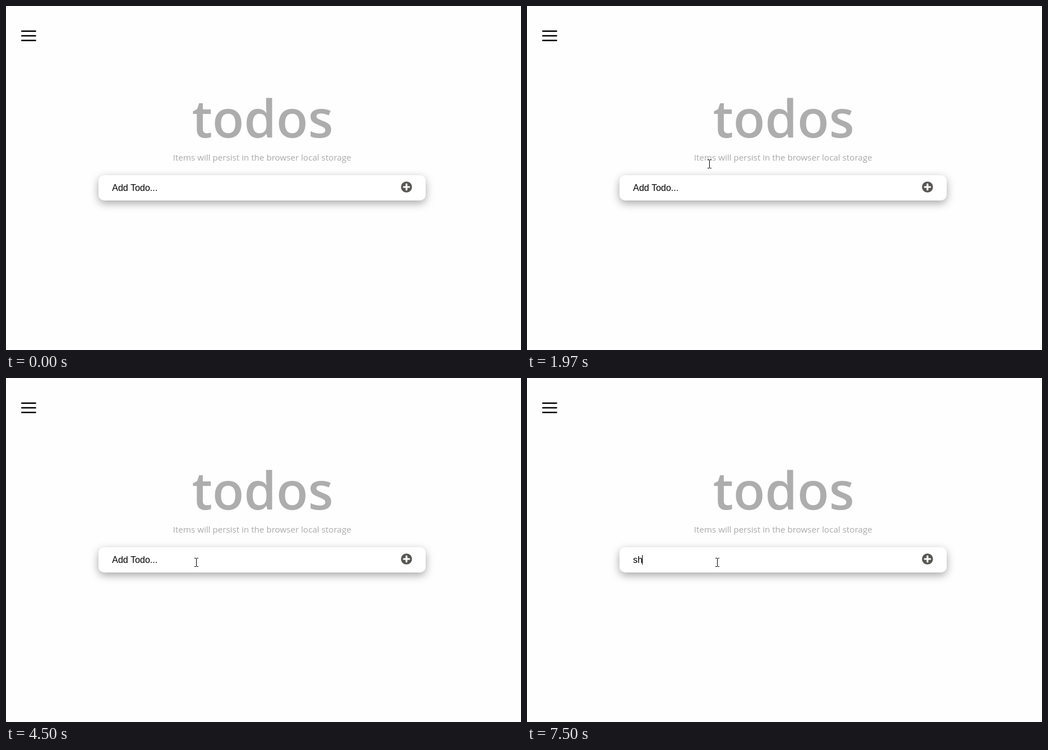
Write an HTML page that moves like this. It is 913x612 px and loops after 8 s.

```html
<!DOCTYPE html>
<html lang="en">
<head>
<meta charset="utf-8">
<title>todos</title>
<style>
  html, body { margin: 0; width: 100%; height: 100%; overflow: hidden; background: #fefefe; }
  #stage { position: absolute; left: 0; top: 0; width: 913px; height: 612px; overflow: hidden; }
  #field {
    position: absolute; left: 164px; top: 301px; width: 580px; height: 45px;
    border-radius: 10px; background: #fff; box-shadow: 0 5px 15px rgba(0, 0, 0, .35);
  }
  svg { position: absolute; left: 0; top: 0; display: block; }
  text { white-space: pre; }
  .ui { font-family: "Open Sans", "Noto Sans", sans-serif; }
  .input { font: 16px "Liberation Sans", Arial, sans-serif; }
  #inspector { position: absolute; inset: 0; background: rgba(111, 168, 220, .66); }
  #tip {
    position: absolute; left: -4px; top: 585px; width: 111px; height: 32px;
    border-radius: 3px; background: #fff; box-shadow: 0 1px 5px rgba(0, 0, 0, .4);
  }
</style>
</head>
<body>
<div id="stage">
  <div id="field"></div>
  <svg width="913" height="612">
    <path d="M28 44.7H52.3M28 53H52.3M28 61.3H52.3" stroke="#000" stroke-width="2.5" stroke-linecap="round"/>
    <g class="ui" text-anchor="middle">
      <text x="455" y="234" font-size="92" font-weight="600" fill="#adadad">todos</text>
      <text x="454" y="275" font-size="15.1" fill="#a9a9a9">Items will persist in the browser local storage</text>
    </g>
    <text id="entry" class="input" x="188" y="329"></text>
    <rect id="caret" y="315" width="1" height="17"/>
    <circle cx="710" cy="322" r="9.8" fill="#585754"/>
    <path d="M705.2 322H714.8M710 317.2V326.8" stroke="#fff" stroke-width="3.2" stroke-linecap="round"/>
  </svg>
  <div id="inspector">
    <div id="tip"></div>
    <svg class="ui" width="913" height="612" font-size="12">
      <text x="5" y="605" font-size="11.8" font-weight="700" fill="#7b2579">html</text>
      <text x="43" y="605" fill="#666">920 × 617</text>
    </svg>
  </div>
  <svg width="913" height="612">
    <path id="arrow" d="M.5 .5V16.5L4.2 13L6.7 18.5L9 17.5L6.6 12.1H11.5Z" fill="#fff" stroke="#000"/>
    <path id="beam" d="M0 0H3V1H4V0H7V1H4V15H7V16H4V15H3V16H0V15H3V1H0Z" shape-rendering="crispEdges"/>
  </svg>
</div>
<script>
const LOOP = 8000;
const PLACEHOLDER = "Add Todo...";
const part = id => document.getElementById(id);

// [start ms, pointer shape, x, y]
const pointerSteps = [
  [0, null, 0, 0],
  [980, "arrow", 872, 112],
  [1480, "arrow", 620, 116],
  [1970, "beam", 320, 273],
  [2480, "beam", 334, 320]
];
const caretToggles = [2980, 3520, 4000, 4500, 5000, 5500, 6010, 6500, 7000];
const typedAt = 7500;

const show = (id, on) => { part(id).style.visibility = on ? "visible" : "hidden"; };

function draw(t) {
  const [, shape, x, y] = pointerSteps.filter(step => step[0] <= t).pop();
  for (const id of ["arrow", "beam"]) {
    show(id, id === shape);
    part(id).setAttribute("transform", `translate(${x} ${y})`);
  }
  show("inspector", t >= 980 && t < 1480);

  const typed = t >= typedAt;
  part("entry").textContent = typed ? "sh" : PLACEHOLDER;
  part("caret").setAttribute("x", typed ? 204 : 188);
  show("caret", caretToggles.filter(at => at <= t).length % 2 === 1);
}

const start = performance.now();
function tick() {
  draw((performance.now() - start) % LOOP);
  requestAnimationFrame(tick);
}
tick();
</script>
</body>
</html>
```
